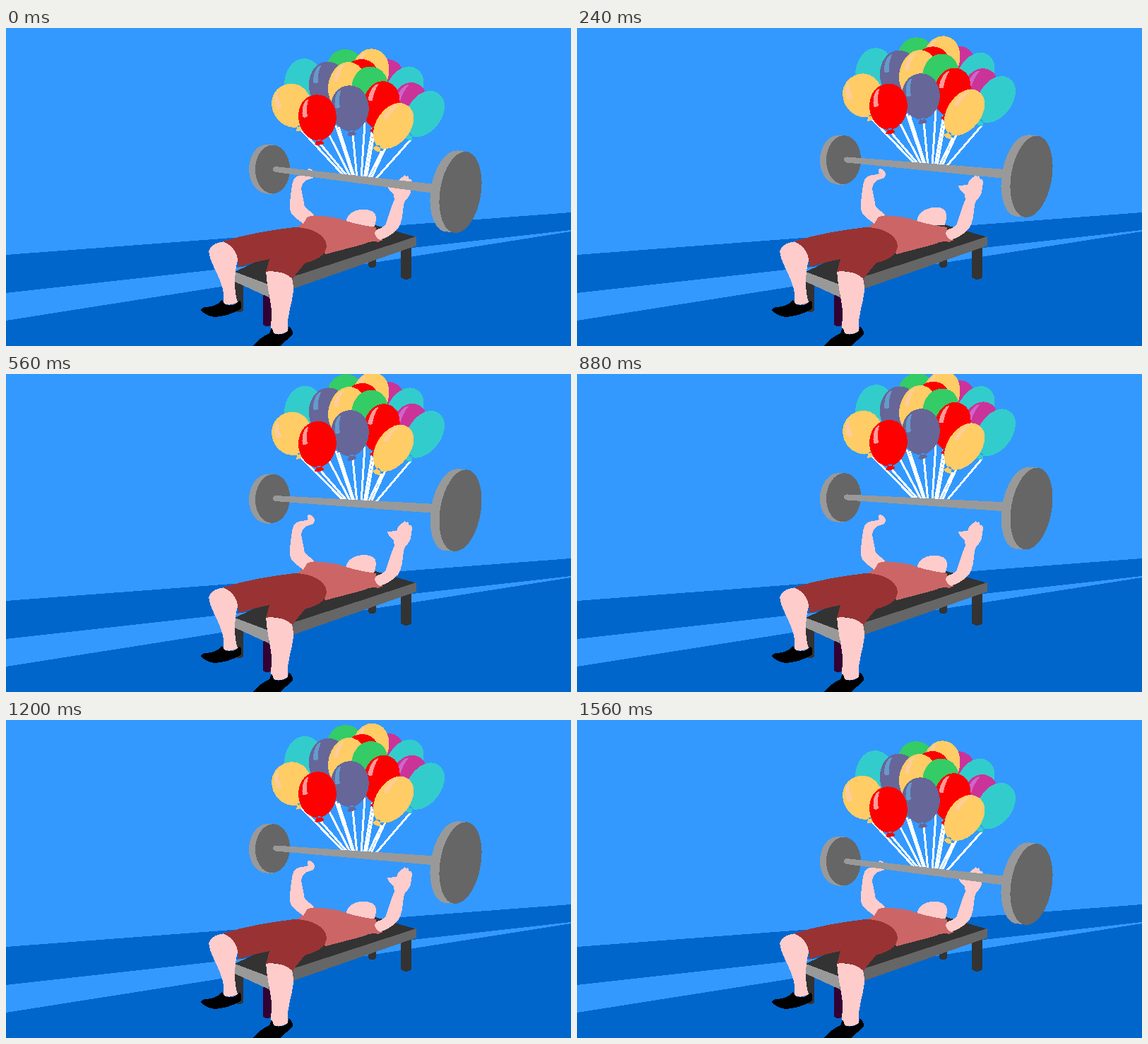
An HTML page for the animation above (1.6 s loop, 800x450 px).

```html
<!DOCTYPE html>
<html lang="en">
<head>
<meta charset="utf-8">
<title>Balloon bench press</title>
<style>
  html, body { margin: 0; width: 100%; height: 100%; overflow: hidden; background: #39f; }
  svg { display: block; width: 100vw; height: 100vh; shape-rendering: crispEdges; }
</style>
</head>
<body>
<svg viewBox="0 0 800 450">
  <path fill="#06c" d="M0 321L800 261V450H0Z"/>
  <path fill="#39f" d="M0 375L800 286V288L0 414Z"/>

  <g id="bench" fill="#333">
    <path d="M513 328H524V337Q518 342 513 337Z"/>
    <path d="M559 308L574 302V353Q567 359 559 353Z"/>
    <path d="M324 355H336V400Q331 404 324 400Z"/>
    <path fill="#303" d="M364 372H376V420Q370 424 364 420Z"/>
    <path d="M324 345L372 364L581 296L520 278L440 290Z"/>
    <path fill="#666" d="M372 363L581 295V308L372 381Z"/>
    <path fill="#999" d="M324 345L372 363V381L324 359Z"/>
  </g>

  <path id="head" fill="#fcc" d="M481 275C482 266 490 257 505 257C517 256 524 261 524 268Q524 277 520 284L500 281Z"/>

  <g id="legs">
    <path fill="#fcc" d="M312 302Q291 303 287 316C288 330 299 345 304 360Q310 376 308 390Q318 394 328 388C323 375 323 350 327 332L335 320Z"/>
    <path d="M276 399Q277 395 284 395Q298 394 306 385L310 391Q319 394 327 390L331 385Q335 392 332 398C320 405 308 408 296 409Q283 408 276 399Z"/>
    <path fill="#fcc" d="M368 343C369 365 374 380 376 400L375 430Q386 437 399 429C397 407 405 392 407 372Q407 358 403 348Z"/>
    <path d="M349 450Q360 438 373 432L376 424L380 433Q391 435 398 430L401 422Q408 430 406 434L388 450Z"/>
  </g>

  <path fill="#c66" d="M409 284Q421 277 426 268Q432 264 443 266C458 267 471 268 481 273Q501 279 524 282Q523 291 534 300L527 303Q518 300 506 306L453 320Z"/>
  <path fill="#933" d="M307 302C338 292 375 286 408 282C435 282 453 294 454 308C453 321 442 328 425 332Q415 341 406 355Q389 341 368 345L373 327Q351 331 329 339Q330 311 307 302Z"/>

  <g id="arms" fill="#fcc">
    <path d="M428 199Q433 199 436 204Q439 209 433 213L426 215Q419 220 418 227C419 236 422 245 423 253L437 265L427 267L421 277Q411 270 404 263Q401 255 402 246C404 235 403 224 408 213Q412 208 420 208L428 206Q425 201 428 199Z"/>
    <path d="M540 223L553 222Q556 213 561 211L564 208L567 210L569 208L571 214Q575 213 575 219L573 233Q570 240 565 245C560 256 564 270 555 284Q546 294 530 300Q523 297 522 290L525 285Q534 283 538 277C542 266 545 253 550 243Q549 236 548 234Q541 230 540 223Z"/>
  </g>

  <g id="lift">
    <path id="strings" fill="none" stroke="#fff" stroke-width="3"/>
    <g id="balloons"></g>
    <g fill="#999">
      <ellipse cx="369" cy="199.5" rx="25" ry="34.5"/>
      <path d="M369 165H378V235H369Z"/>
      <ellipse cx="377.5" cy="200" rx="24.5" ry="34.5" fill="#666"/>
      <path d="M382 196L606 221V234L382 204Q378 203 378 200Q378 196 382 196Z"/>
      <ellipse cx="631" cy="231" rx="29.5" ry="58" transform="rotate(9 631 231)"/>
      <path d="M638 173L651 175L636 290L623 288Z"/>
      <ellipse cx="643.5" cy="232.5" rx="29" ry="58" transform="rotate(9 643.5 232.5)" fill="#666"/>
    </g>
  </g>
</svg>
<script>
const $ = id => document.getElementById(id);

// name: [body, highlight]
const COLORS = {
  green: ['#3c6', '#3c6'], yellow: ['#fc6', '#fc9'], pink: ['#c39', '#c6c'],
  red: ['#f00', '#f99'], teal: ['#3cc', '#3cc'], purple: ['#669', '#69c']
};

// color, center x, center y, tilt; back to front
const BALLOONS = [
  ['green', 480, 63, 0], ['pink', 538, 78, 10], ['yellow', 516, 63, 8], ['red', 503, 77, 0],
  ['teal', 420, 77, 12], ['purple', 455, 81, 4], ['teal', 563, 88, 30], ['pink', 569, 111, 22],
  ['yellow', 482, 82, 15], ['green', 515, 88, 5], ['yellow', 405, 110, -20], ['red', 531, 109, 14],
  ['teal', 592, 122, 33], ['purple', 487, 114, -4], ['red', 441, 127, -4], ['yellow', 548, 139, 35]
];

// top x, top y, x at the bar
const STRINGS = [
  [418, 144, 482], [445, 164, 486], [458, 152, 489], [467, 138, 492], [471, 140, 494], [491, 150, 497],
  [508, 134, 503], [519, 142, 507], [522, 145, 510], [532, 174, 513], [538, 168, 517], [574, 157, 524]
];

const EGG = 'M0-33C18-33 27-17 27-1C27 17 14 33 0 33C-14 33-27 17-27-1C-27-17-18-33 0-33Z';
const KNOT = 'M-2 31L-7 38Q0 41 7 37L2 31Z';
const SHINE = 'M-21-3C-22-16-17-27-11-27C-14-20-15-11-14-3Q-18 0-21-3Z';

$('balloons').innerHTML = BALLOONS.map(([color, x, y, tilt]) => {
  const [body, shine] = COLORS[color];
  const stretch = 1 + tilt * 0.0025; // balloons leaning right are longer
  return `<g transform="translate(${x} ${y}) rotate(${tilt}) scale(${0.985 / stretch} ${stretch})">
    <path fill="${body}" d="${EGG + KNOT}"/><path fill="${shine}" d="${SHINE}"/></g>`;
}).join('');
$('strings').setAttribute('d', STRINGS.map(([x, y, end]) => `M${x} ${y}L${end} 213`).join(''));

const LOOP = 1600, STEP = 40, FLIGHT = 1560, NOD = 660;

function draw(now) {
  const t = Math.floor(now % LOOP / STEP) * STEP;
  // Thrown upwards under gravity, the right end rising further than the left
  const rise = 42.3 * (1 - (2 * t / FLIGHT - 1) ** 2);
  const slope = -rise / 662;
  $('lift').setAttribute('transform', `matrix(1 ${slope} 0 1 0 ${slope * 25})`);

  const nod = t < NOD ? -9 * Math.sin(Math.PI * t / NOD) ** 2 : 0;
  $('head').setAttribute('transform', `rotate(${nod} 483 276)`);
}

const start = performance.now();
function tick() {
  draw(performance.now() - start);
  requestAnimationFrame(tick);
}
tick();
</script>
</body>
</html>
```
